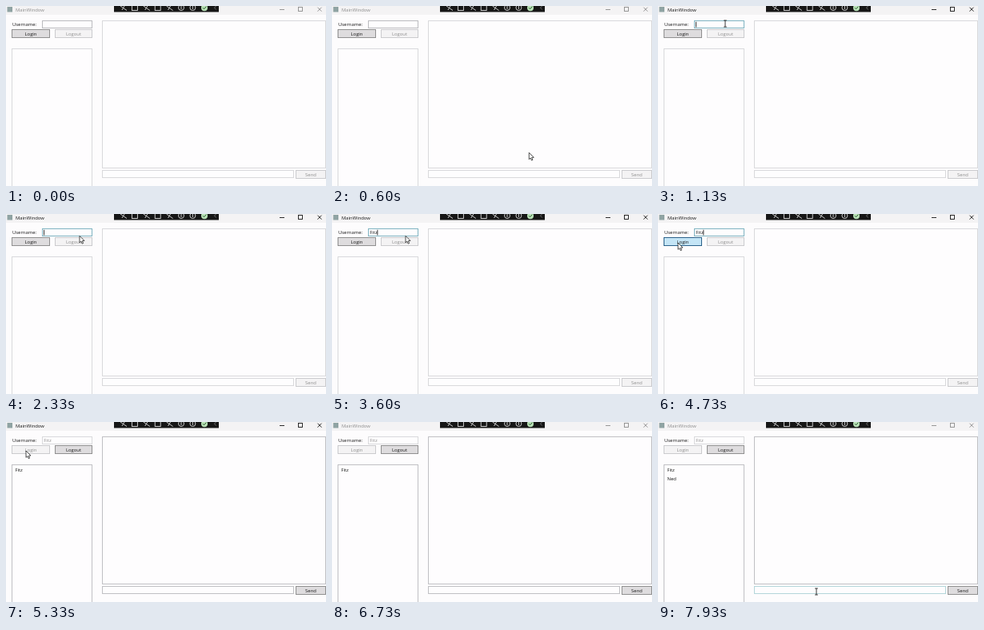
Write an HTML page with a canvas that moves like this. It is 400 px wide and 225 px high and loops after 8000 ms.

```html
<!DOCTYPE html>
<html lang="en">
<head>
<meta charset="utf-8">
<title>Chat login</title>
<style>
  html, body { margin: 0; width: 100%; height: 100%; overflow: hidden; background: #fdfcfd; }
  canvas { display: block; width: 400px; height: 225px; }
</style>
</head>
<body>
<canvas id="stage" width="400" height="225"></canvas>
<script>
const ctx = document.getElementById('stage').getContext('2d');
const LOOP = 8000;

// Moments in ms
const FOCUS = 1000, FIRST_KEY = 2450, KEY_GAP = 240;
const PRESS = 4580, LOGIN = 4780, BLUR = 6300, SECOND_USER = 7250;
const USER = 'Fitz', FRIEND = 'Ned';

const MOVES = [
  { at: 560, lasts: 370, from: [252, 189], to: [84, 22] },
  { at: 1900, lasts: 250, from: [84, 22], to: [92, 27.4] },
  { at: 3700, lasts: 550, from: [92, 27.4], to: [26, 29] },
  { at: 4360, lasts: 120, from: [26, 29], to: [25, 36] },
  { at: 5600, lasts: 600, from: [25, 36], to: [410, 175] },
  { at: 7420, lasts: 330, from: [310, 228], to: [198, 212] }
];

const FIELD = [45.5, 18.5, 62, 9], MESSAGE = [120.5, 205.5, 239, 9];
const LOGIN_BOX = [7.5, 29.5, 47, 10];

const INK = '#161616', FAINT = '#8d8d8d';

function pointerAt(t) {
  const move = MOVES.findLast(m => m.at <= t);
  if (!move) return null;
  const k = Math.min(1, (t - move.at) / move.lasts), ease = k * k * (3 - 2 * k);
  const [x, y] = move.from.map((v, i) => v + (move.to[i] - v) * ease);
  return { x, y };
}

function over(p, [x, y, w, h]) {
  return !!p && p.x >= x && p.x <= x + w && p.y >= y - 0.6 && p.y <= y + h - 0.3;
}

function text(value, x, y, color = INK, align = 'left') {
  ctx.font = '5.9px "Open Sans", "Noto Sans", sans-serif';
  ctx.textAlign = align;
  ctx.fillStyle = color;
  ctx.fillText(value, x, y);
}

function box(rect, border, fill = '#fefdfe') {
  ctx.fillStyle = fill;
  ctx.fillRect(...rect);
  ctx.strokeStyle = border;
  ctx.lineWidth = 1;
  ctx.strokeRect(...rect);
}

function line(x1, y1, x2, y2, color, width = 0.9) {
  ctx.beginPath();
  ctx.moveTo(x1, y1);
  ctx.lineTo(x2, y2);
  ctx.strokeStyle = color;
  ctx.lineWidth = width;
  ctx.stroke();
}

function button(label, rect, enabled, hover, pressed) {
  const [fill, border] = !enabled ? ['#f4f3f4', '#cbcbce']
    : pressed ? ['#c4e5f6', '#2c628b']
    : hover ? ['#bee6fd', '#5b94b5'] : ['#dedcde', '#909090'];
  box(rect, border, fill);
  text(label, rect[0] + rect[2] / 2, rect[1] + 7.6, enabled ? INK : FAINT, 'center');
}

function titleBar(active) {
  const ink = active ? INK : FAINT;
  ctx.fillStyle = '#f4f3f4';
  ctx.fillRect(0, 0, 400, 11);
  ctx.fillStyle = '#8fa3a3';
  ctx.fillRect(1.5, 1, 6.5, 6.5);
  text('MainWindow', 12, 6.8, ink);
  line(342, 4.5, 348, 4.5, ink);
  ctx.strokeRect(365.5, 1.5, 5, 5);
  line(389.5, 1.7, 394.5, 6.7, ink);
  line(394.5, 1.7, 389.5, 6.7, ink);
}

function debugBar() {
  ctx.fillStyle = INK;
  ctx.fillRect(135, 0, 131, 7.5);
  for (let i = 0; i < 7; i++) {
    const x = 147 + i * 14.4, ink = '#dcdcdc';
    if (i > 4) {
      ctx.beginPath();
      ctx.arc(x, 2, 3.5, 0, 7);
      ctx.stroke();
      line(x, 0, x, 4, ink);
    } else if (i % 2) {
      ctx.strokeRect(x - 4, -2, 7, 7.5);
    } else {
      line(x - 4, 0, x + 4, 5.5, ink);
      line(x - 2, 5, x + 1, 0, ink);
    }
    ctx.strokeStyle = ink;
  }
  ctx.beginPath();
  ctx.arc(248, 2.2, 4, 0, 7);
  ctx.fillStyle = '#b9e2b7';
  ctx.fill();
  line(246, 2.2, 247.5, 3.8, '#214a25');
  line(247.5, 3.8, 250.3, 0.7, '#214a25');
  line(262.5, 0, 260.5, 2.2, '#777');
  line(260.5, 2.2, 262.5, 4.4, '#777');
}

function drawArrow({ x, y }) {
  const shape = new Path2D('M0 0V8.4L1.9 6.7 3.2 9.7 4.6 9.1 3.4 6.2 6 6Z');
  ctx.save();
  ctx.translate(x, y);
  ctx.fillStyle = '#fff';
  ctx.fill(shape);
  ctx.strokeStyle = '#222';
  ctx.lineWidth = 0.8;
  ctx.stroke(shape);
  ctx.restore();
}

function drawBeam({ x, y }) {
  line(x, y - 4, x, y + 4, '#222');
  for (const dy of [-4, 4]) line(x - 1.8, y + dy, x + 1.8, y + dy, '#222');
}

function draw(t) {
  const pointer = pointerAt(t);
  const loggedIn = t >= LOGIN;
  const focused = t >= FOCUS && !loggedIn;
  const onField = !loggedIn && over(pointer, FIELD);
  const onMessage = loggedIn && over(pointer, MESSAGE);
  const panel = loggedIn ? '#c0c0c4' : '#d9d9dc';

  ctx.fillStyle = '#fdfcfd';
  ctx.fillRect(0, 0, 400, 225);
  titleBar(t >= FOCUS && t < BLUR);
  debugBar();

  text('Username:', 8, 25);
  box(FIELD, loggedIn ? '#d9d9dc' : focused ? '#7fb3c1' : onField ? '#9cc8d4' : '#bbbbbf');
  const keys = Math.floor((t - FIRST_KEY) / KEY_GAP) + 1;
  const typed = USER.slice(0, Math.max(0, keys));
  text(typed, 47.3, 25, loggedIn ? FAINT : INK);

  // The caret blink restarts with every key.
  const blinkStart = typed ? FIRST_KEY + (typed.length - 1) * KEY_GAP : FOCUS;
  if (focused && (t - blinkStart) % 1060 < 530) {
    const x = 47.5 + ctx.measureText(typed).width;
    line(x, 19.8, x, 26.5, '#222');
  }

  button('Login', LOGIN_BOX, !loggedIn, over(pointer, LOGIN_BOX), t >= PRESS);
  button('Logout', [61.5, 29.5, 46, 10], loggedIn);
  box([7.5, 53.5, 100, 180], panel);
  if (loggedIn) text(USER, 11.5, 62.2);
  if (t >= SECOND_USER) text(FRIEND, 11.5, 72.7);

  box([120.5, 18.5, 279, 184], panel);
  box(MESSAGE, onMessage ? '#b4d6da' : panel);
  button('Send', [362.5, 205.5, 37, 10], loggedIn);

  if (pointer) (onField || onMessage ? drawBeam : drawArrow)(pointer);
}

const start = performance.now();
function tick() {
  draw((performance.now() - start) % LOOP);
  requestAnimationFrame(tick);
}
tick();
</script>
</body>
</html>
```
